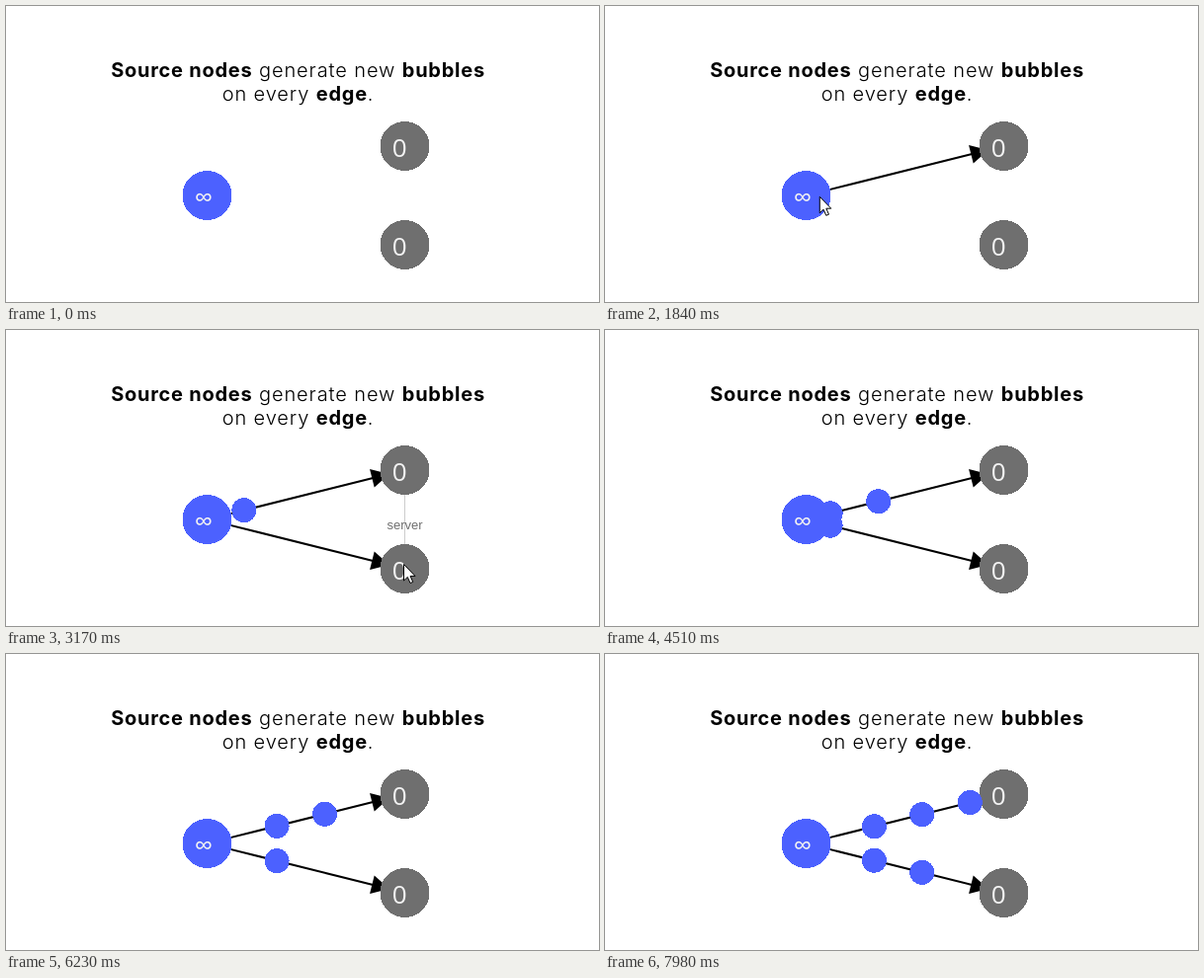
These frames come from a looping animation (600x300 px, 8 s). An HTML page:

```html
<!DOCTYPE html>
<html lang="en">
<head>
<meta charset="utf-8">
<title>Source nodes</title>
<style>
html, body { margin: 0; width: 100%; height: 100%; overflow: hidden; background: #fff; }
svg { display: block; width: 600px; height: 300px; }
.title { font: 300 20px Inter, sans-serif; letter-spacing: .9px; text-anchor: middle; }
.strong { font-weight: 700; letter-spacing: .75px; }
.count { font: 500 26px "Open Sans", sans-serif; fill: #f2f2f2; }
.label { font: 13px "Liberation Sans", Arial, sans-serif; fill: #6f6f6f; text-anchor: middle; }
.edge line { stroke: #000; stroke-width: 2; }
circle { shape-rendering: crispEdges; }
.blue { fill: #4c61ff; }
.gray { fill: #6f6f6f; }
</style>
</head>
<body>
<svg viewBox="0 0 600 300">
  <g class="title">
    <text x="295.5" y="72"><tspan class="strong">Source nodes</tspan> generate new <tspan class="strong">bubbles</tspan></text>
    <text x="295.5" y="96">on every <tspan class="strong">edge</tspan>.</text>
  </g>
  <line id="guide" x1="403.5" y1="142" x2="403.5" y2="242" stroke="#ccc"/>
  <g id="edges"></g>
  <g id="nodes"></g>
  <g id="bubbles"></g>
  <text id="label" class="label"></text>
  <path id="cursor" d="M.5 .5V17L4.3 13.4 7 19.5 9.7 18.4 7.1 12.4H12Z" fill="#fff" stroke="#000"/>
</svg>
<script>
const LOOP = 8000;
const SPEED = 0.0267;      // bubble travel along x, px per ms
const FIRST_SPAWN = 2680;
const SPAWN_EVERY = 1816;
const HOVER_DELAY = 80;

const source = { x: 203.5, y: 192, text: '∞', name: 'source', cls: 'blue' };
const [upper, lower] = [142, 242].map(y => ({ x: 403.5, y, text: '0', name: 'server', cls: 'gray' }));

// Where the pointer rests and when; between rests it glides.
const restAtSource = { node: source, x: 216, y: 193 };
const rests = [
  { x: 367, y: 275, arrive: 260, leave: 260 },
  { ...restAtSource, arrive: 730, leave: 890 },
  { node: upper, x: 416, y: 143, arrive: 1400, leave: 1600 },
  { ...restAtSource, arrive: 1850, leave: 2490 },
  { node: lower, x: 402, y: 237, arrive: 3080, leave: 3300 },
  { x: 408, y: 265, arrive: 3520, leave: 3520 }
];

const $ = id => document.getElementById(id);
const show = (el, on) => el.setAttribute('visibility', on ? 'visible' : 'hidden');
const ease = u => u * u * (3 - 2 * u);
const mix = (a, b, u) => a + (b - a) * u;

function add(parent, tag, attrs, text = '') {
  const el = document.createElementNS('http://www.w3.org/2000/svg', tag);
  for (const key in attrs) el.setAttribute(key, attrs[key]);
  el.textContent = text;
  return parent.appendChild(el);
}

for (const node of [source, upper, lower]) {
  add($('nodes'), 'circle', { cx: node.x, cy: node.y, r: 25, class: node.cls });
  add($('nodes'), 'text', { x: node.x - 12.8, y: node.y + 10.5, class: 'count' }, node.text);
}

const edges = [upper, lower].map(target => {
  const angle = Math.atan2(target.y - source.y, target.x - source.x);
  const el = add($('edges'), 'g', {
    class: 'edge',
    transform: `translate(${source.x} ${source.y}) rotate(${angle * 180 / Math.PI})`
  });
  add(el, 'line', { x1: 20, x2: 174 });
  add(el, 'path', { d: 'M172-9.6L190 0 172 9.6Z' });
  return { el, angle, madeAt: rests.find(rest => rest.node === target).arrive };
});

// Every edge that exists at a spawn time sends out a bubble.
const bubbles = [];
for (let born = FIRST_SPAWN; born < LOOP; born += SPAWN_EVERY) {
  for (const { angle, madeAt } of edges) {
    if (madeAt + SPAWN_EVERY / 2 > born) continue;
    bubbles.push({ born, angle, el: add($('bubbles'), 'circle', { r: 12.5, class: 'blue' }) });
  }
}

function drawBubble({ born, angle, el }, t) {
  const distance = 25 + (t - born) * SPEED / Math.cos(angle);
  el.setAttribute('cx', source.x + distance * Math.cos(angle));
  el.setAttribute('cy', source.y + distance * Math.sin(angle));
  show(el, t >= born);
}

function drawCursor(t) {
  const visible = t >= rests[0].arrive && t < rests.at(-1).arrive;
  show($('cursor'), visible);
  if (!visible) return;
  const next = rests.findIndex(rest => t < rest.arrive);
  const from = rests[next - 1], to = rests[next];
  const u = ease(Math.max(0, (t - from.leave) / (to.arrive - from.leave)));
  $('cursor').setAttribute('transform', `translate(${mix(from.x, to.x, u)} ${mix(from.y, to.y, u)})`);
}

function drawHover(t) {
  const rest = rests.find(({ node, arrive, leave }) =>
    node && t >= arrive + HOVER_DELAY && t < leave + HOVER_DELAY);
  const node = rest && rest.node;
  show($('label'), node);
  show($('guide'), node === lower);
  if (!node) return;
  $('label').textContent = node.name;
  $('label').setAttribute('x', node.x);
  $('label').setAttribute('y', node.y - 40);
}

function render(t) {
  for (const { el, madeAt } of edges) show(el, t >= madeAt);
  for (const bubble of bubbles) drawBubble(bubble, t);
  drawHover(t);
  drawCursor(t);
}

const start = performance.now();
function frame() {
  render((performance.now() - start) % LOOP);
  requestAnimationFrame(frame);
}
frame();
</script>
</body>
</html>
```
